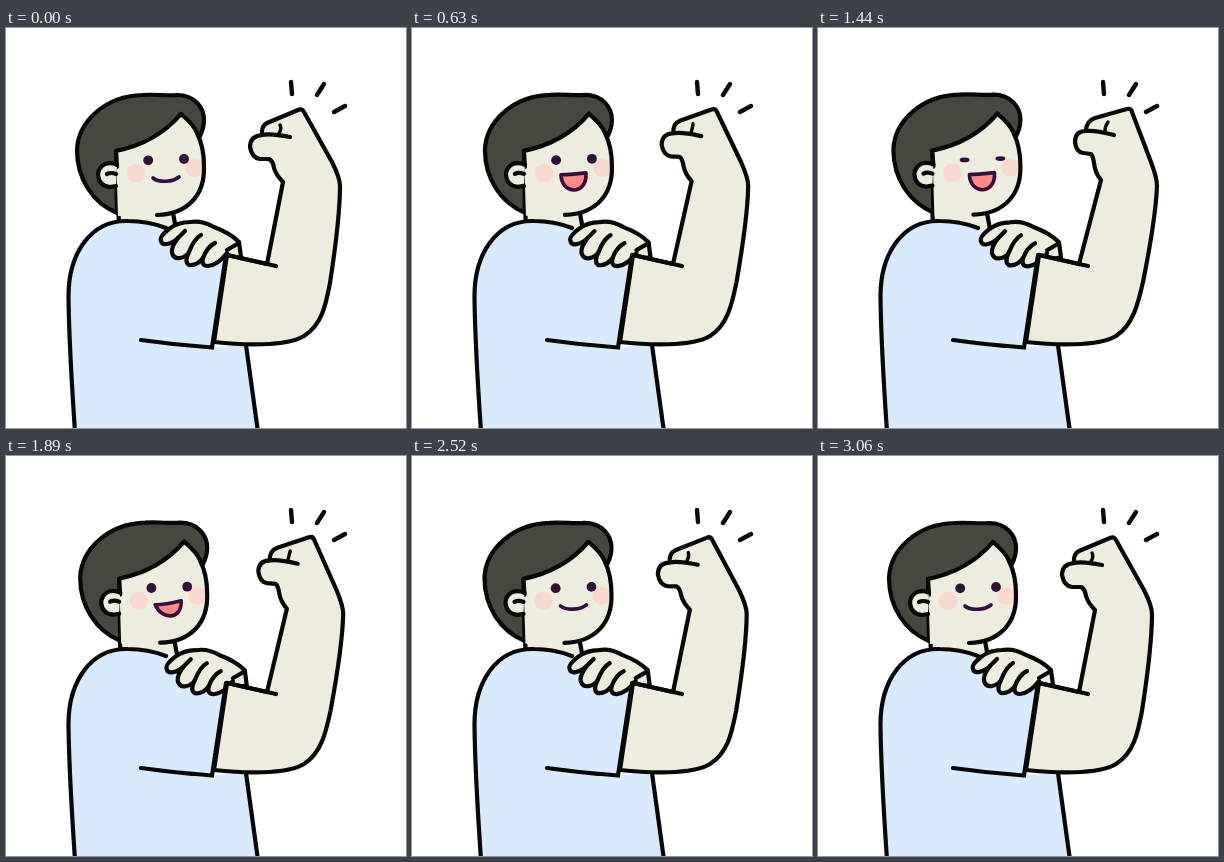
These frames come from a looping animation (400x400 px, 4060 ms). An HTML page:

```html
<!DOCTYPE html>
<html lang="en">
<head>
<meta charset="utf-8">
<title>Flexing arm</title>
<style>
  html, body { margin: 0; width: 100%; height: 100%; overflow: hidden; background: #fff; }
  svg { display: block; width: 100vw; height: 100vh; }
  .line { fill: none; }
  .skin { fill: #ecedde; }
  .hair { fill: #46473e; }
  .shirt { fill: #d9eafd; }
  .blush { fill: #f7d9cf; stroke: none; }
  .eye { fill: #2f1236; stroke: none; }
  .bare { stroke: none; }
  #mouth { fill: #ff8a86; stroke: #35103f; stroke-width: 3.6; }
</style>
</head>
<body>
<svg viewBox="0 0 400 400" stroke="#080808" stroke-width="4.2" stroke-linecap="round" stroke-linejoin="round">
  <g stroke-width="4.4">
    <path d="M285 54L286 66M318 56L311 67M339 78L328 84"/>
  </g>

  <g id="neck">
    <path class="skin bare" d="M112 150L114 206L172 206L168 170Z"/>
    <path class="line" d="M111 158L113 196M167 185L170 201"/>
  </g>

  <g id="head">
    <path class="hair" d="M111 185C87 175 71 151 71 122C72 93 100 68 136 67C150 66 160 68 171 67C189 67 198 80 198 92Q198 100 194 108L175 86C158 106 135 118 110 123Z"/>
    <path class="skin bare" d="M110 123C135 118 158 106 175 86C181 91 188 97 191 105C196 115 198 128 198 138C199 166 184 184 156 187L112 188Z"/>
    <circle class="blush" cx="130" cy="145" r="9.3"/>
    <circle class="blush" cx="188" cy="140" r="9"/>
    <path class="line" d="M111 139L110 123C135 118 158 106 175 86C181 91 188 97 191 105C196 115 198 128 198 138C199 167 182 186 151 187"/>
    <path class="skin" d="M111 137Q106 134 99 136Q92 140 92 147Q93 158 104 159L110 158"/>
    <path class="line" d="M101 146Q105 144 110 146"/>
    <ellipse class="eye" cx="142.2" cy="132.3" rx="4.9" ry="4.9"/>
    <ellipse class="eye" cx="178" cy="131" rx="4.9" ry="4.9"/>
    <path id="mouth"/>
  </g>

  <path class="shirt bare" d="M69 404C66 360 63 310 62.5 270C62 225 85 192 122 193Q142 193 160 200L220 227L207 319L240 317L252 404Z"/>
  <path class="line" d="M69 404C66 360 63 310 62.5 270C62 225 85 192 122 193Q142 193 160 200M240 317L252 404"/>

  <g id="hand">
    <path class="skin" d="M220 232L235 229L233 214Q224 205 208 199Q196 192 184 194Q172 194 163 201Q153 209 155 213Q156 217 161 216Q167 215 172 210Q165 219 166 225Q168 231 174 230Q180 229 183 224Q178 234 183 237Q191 238 197 230Q195 238 202 238Q212 237 221 225"/>
    <path class="line" d="M172 210L179 203M183 224Q188 211 195 207M197 230Q201 219 209 215M221 222L233 215"/>
  </g>

  <path id="arm" class="skin"/>
  <path id="thumb" class="line"/>
  <path id="knuckle" class="line" stroke-width="3.4"/>
  <path class="line" d="M221 227L270 238"/>
  <path class="line" stroke-linejoin="miter" d="M220 227L206 319.5Q170 317 135 312"/>
</svg>

<script>
const LOOP = 4060, STEP = 90, LAST = 3060;
const $ = id => document.getElementById(id);
const eyes = document.querySelectorAll('.eye');

// Each limb part: relaxed outline, flexed outline.
const limb = {
  arm: [
    'M208 314C235 317 280 319 298 308C316 297 320 276 324 255C328 229 334 185 334 158C334 150 330 142 326 134L298 84Q296 80 292 82L261 95Q255 98 256 107Q244 108 244 119Q246 130 254 131L263 131Q267 133 268 140Q270 147 277 154L261 236L221 227Z',
    'M208 314C235 317 280 319 298 308C315 297 320 276 325 254C330 229 338 185 339 158C339 150 336 142 333 134L314 84Q313 80 309 81L277 90Q268 93 268 103Q257 103 257 114Q258 124 265 125L273 126Q275 128 276 135Q277 145 283 152L261 236L221 227Z'
  ],
  thumb: ['M256 107Q264 105 284 109', 'M268 103Q277 102 296 107'],
  knuckle: ['M274 97Q276 101 273 105', 'M290 94Q287 98 287 103']
};

const smile = 'M147 150C153 155 167 154 173 149C167 154 153 155 147 150Z';
const grin = 'M147 147C155 147 163 146 172 145C174 167 148 168 147 147Z';
const oval = 'M146 155C145 147 173 147 173 153C174 163 147 164 146 155Z';
const talk = 'M146 149C155 149 164 147 172 145C173 164 153 165 146 149Z';

const mouthKeys = [[0, smile], [90, smile], [270, grin], [630, grin], [900, oval],
  [1080, oval], [1350, grin], [1530, grin], [1800, talk], [1980, talk], [2250, smile], [LAST, smile]];
const armKeys = [[0, 0], [1440, 1], [2700, 0], [LAST, 0]];
const leanKeys = [[0, 0], [1440, 1], [LAST, 0]];
const eyeKeys = [[0, 1], [1260, 1], [1440, .48], [1620, 1], [LAST, 1]];

const mix = (a, b, k) => a + (b - a) * k;

function morph(a, b, k) {
  const ends = b.match(/\d+/g);
  let i = 0;
  return a.replace(/\d+/g, n => mix(+n, +ends[i++], k).toFixed(2));
}

function sample(keys, t, blend) {
  const i = Math.max(1, keys.findIndex(key => key[0] >= t));
  const [t0, a] = keys[i - 1], [t1, b] = keys[i];
  return blend(a, b, (t - t0) / (t1 - t0));
}

const shift = (id, x, y) => $(id).setAttribute('transform', `translate(${x} ${y})`);

function draw(t) {
  const flex = sample(armKeys, t, mix);
  const lean = sample(leanKeys, t, mix);
  const open = sample(eyeKeys, t, mix);
  for (const id in limb) $(id).setAttribute('d', morph(...limb[id], flex));
  $('mouth').setAttribute('d', sample(mouthKeys, t, morph));
  eyes.forEach(eye => eye.setAttribute('ry', 4.9 * open));
  shift('head', 4.4 * lean, -.4 * lean);
  shift('neck', 2 * lean, 0);
  shift('hand', 8 * lean, .3 * lean);
}

const start = performance.now();
function tick() {
  const t = (performance.now() - start) % LOOP;
  draw(Math.min(LAST, Math.floor(t / STEP) * STEP));
  requestAnimationFrame(tick);
}
tick();
</script>
</body>
</html>
```
